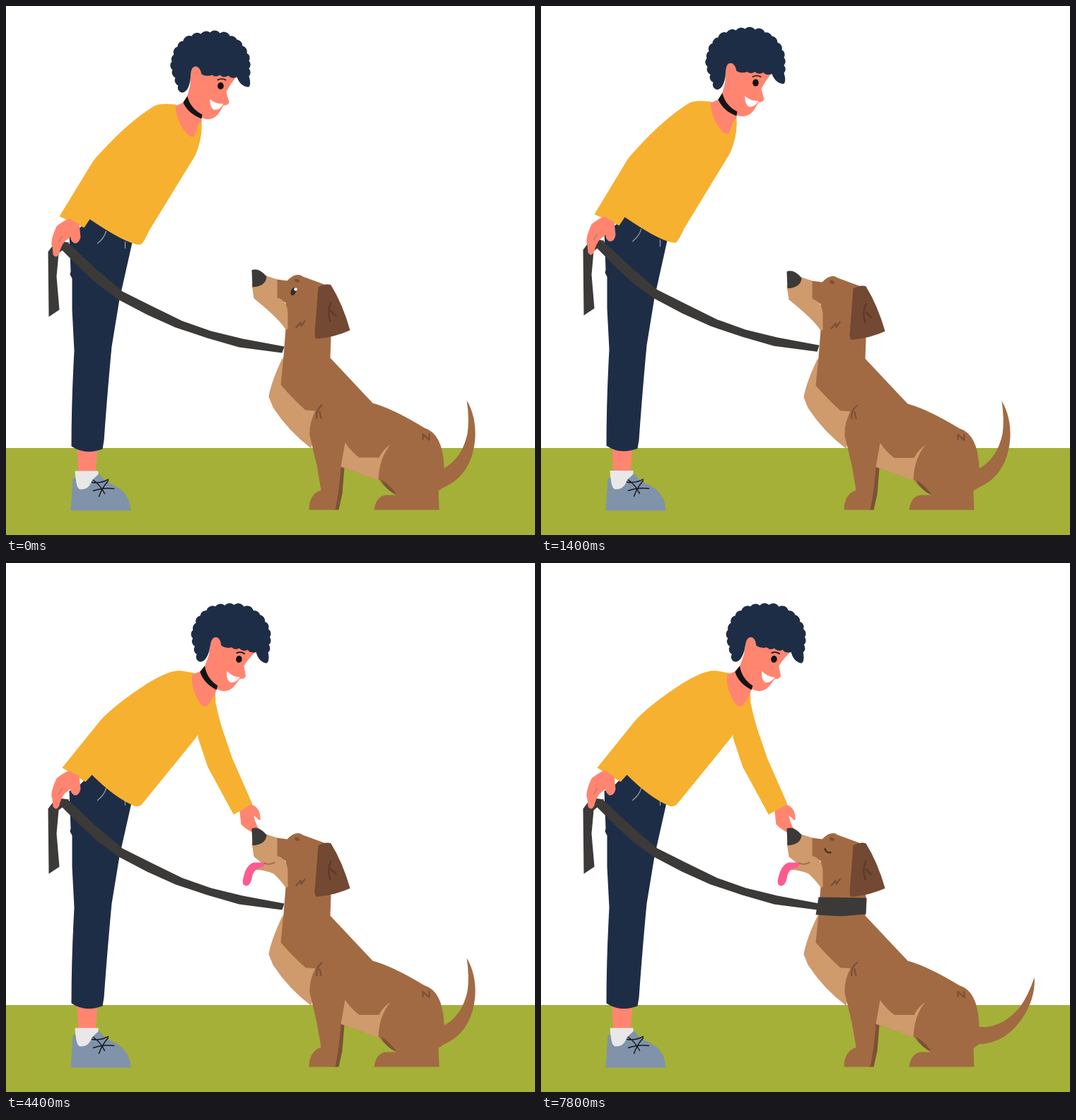
Recreate the animation shown at these times as an HTML page. Size 748x748 px, loop 9.8 s.

```html
<!DOCTYPE html>
<html lang="en">
<head>
<meta charset="utf-8">
<title>Meeting the dog</title>
<style>
  html, body { margin: 0; width: 100%; height: 100%; overflow: hidden; background: #fff; }
  svg { display: block; width: 100%; height: 100%; }
  .skin { fill: #ff8570; }
  .navy { fill: #1e2d46; }
  .shirt { fill: #f6b130; }
  .strap { fill: #3b3a39; }
  .fur { fill: #a26a43; }
  .light { fill: #cf9a6c; }
  .dark { fill: #734933; }
  .shade { fill: #7c5136; }
  .line { fill: none; stroke-width: 2.4; stroke-linecap: round; stroke-linejoin: round; }
</style>
</head>
<body>
<svg viewBox="0.5 0.5 748 748">
  <rect y="625.5" width="760" height="130" fill="#a5b038"/>

  <g id="person">
    <path class="skin" d="M101 626H130L127 662H103Z"/>
    <path fill="#e8e8e8" d="M98 658H131V666L120 686H100Z"/>
    <path fill="#8093aa" d="M95 668H99Q100 682 105 684Q118 685 122 671L132 662Q140 673 151 677Q176 688 177 714H92Z"/>
    <path class="line" stroke="#151a22" style="stroke-width:1.5" d="M122 674Q134 676 145 670M124 686Q138 681 153 683M124 671Q134 678 140 690M145 672Q136 682 132 694"/>
    <path class="navy" d="M121 298L105 314L90 323L92 376L91 380L94 386L94 430L97 488Q93 560 93 623Q112 636 137 627L139 615Q144 545 150 482L161 415L179 335Z"/>
    <path class="line" stroke="#8f99a8" style="stroke-width:1.3" d="M142 319Q140 328 130 336M169 334V343"/>

    <g id="arm">
      <path class="skin" d="M314 355L331 347Q342 353 342 363V370Q340 373 337 367L333 364Q335 379 341 389Q338 394 333 390Q320 382 314 374Z"/>
      <path class="shirt" d="M296 186Q298 215 303 240L312 280L333 347L305 359L276 288L267 246L270 200Z"/>
    </g>

    <g id="upright">
      <path class="shirt" d="M76 298L123 221Q128 214 135 207Q174 164 210 142Q218 137 241 140L260 160L277 163Q279 186 268 212L203 318Q194 338 190 338Q172 338 119 302L111 314Z"/>
      <path class="skin" d="M258 125L251 137L240 142Q242 166 257 182Q264 188 267 183L272 169L277 163V156Z"/>
    </g>
    <g id="leaning">
      <path class="shirt" d="M80 290L134 223Q154 201 200 171Q234 150 249 153L266 156L290 178L296 184Q299 200 292 217L268 249L194 340Q190 346 182 344Q155 333 122 300L113 310Z"/>
      <path class="skin" d="M281 146L275 154L264 158Q261 175 273 196Q280 207 286 202L291 194L296 186L299 176Z"/>
    </g>

    <g id="head">
      <path class="skin" d="M262 95Q263 86 269 86Q275 87 277 96L290 90L327 100Q318 110 312 122Q314 130 316 136Q315 141 308 141Q303 150 300 154Q291 164 278 159L256 132L261 112Z"/>
      <path class="navy" d="M250 123A7 7 0 0 1 244 113A8 8 0 0 1 240 102A8 8 0 0 1 236 91A8 8 0 0 1 235 79A8 8 0 0 1 238 69A8 8 0 0 1 243 58A8 8 0 0 1 251 50A9 9 0 0 1 263 43A9 9 0 0 1 276 40A9 9 0 0 1 289 38A9 9 0 0 1 303 39A9 9 0 0 1 317 43A9 9 0 0 1 327 48A9 9 0 0 1 335 57A8 8 0 0 1 341 67A8 8 0 0 1 344 78A8 8 0 0 1 344 89A8 8 0 0 1 344 100C347 108 346 116 342 115C335 114 330 109 327 101Q319 104 315 99Q308 103 303 98Q297 102 292 98Q284 101 277 97Q275 87 269 86Q263 86 262 95L261 106Q258 122 250 123Z"/>
      <path fill="#141414" d="M257 128Q261 145 278 154L277 160Q258 153 251 137Z"/>
      <path fill="#fff" d="M289 132Q296 139 308 139Q302 149 294 147Q288 142 289 132Z"/>
      <ellipse cx="304" cy="113.5" rx="4.3" ry="5" fill="#141414"/>
      <path class="line" stroke="#141414" style="stroke-width:1.7" d="M300 105Q305 102 311 105"/>
    </g>

    <path class="strap" d="M60 348L66 340L76 333L90 335L80 346L75 350L72 383L76 430L61 440Z"/>
    <path class="strap" d="M79 345L105 371L130 394L160 416L200 437L240 455L285 470L330 483L391 491L394 482L335 471L290 460L250 446L205 424L165 404L125 370L89 336Z"/>
    <g id="hand">
      <path class="skin" d="M72 312Q82 304 90 301L104 309L106 327Q104 337 97 336Q91 332 92 327L84 333Q78 340 76 350Q72 359 67 352L66 341Q62 334 72 312Z"/>
      <path class="line" stroke="#a87b78" style="stroke-width:1.2" d="M80 326L75 334"/>
    </g>
  </g>

  <g id="dog">
    <path id="tail" class="fur" d="M652 558Q665 580 664 610Q660 668 612 684L606 660L622 653Q646 638 653 605Q656 585 652 558Z"/>
    <path class="light" d="M392 497Q375 533 372 553L378 568Q400 602 432 626L445 575L395 525Z"/>
    <path class="shade" d="M473 650L479 653L476 690L471 713H464Z"/>
    <path class="fur" d="M383 387L398 389Q411 376 420 383L450 394L460 470L459 498L519 562Q548 570 592 597Q618 605 620 652L621 680L612 686L613 713H521Q524 693 538 692H553Q533 680 529 671L474 652Q472 684 466 713H429Q429 691 446 685L440 650L430 608Q429 590 438 573L424 572Q405 555 389 536L393 495L396 457V420L383 414Z"/>
    <path class="shade" d="M531 670Q537 685 553 692Q546 680 531 670Z"/>
    <path class="light" d="M480 618Q490 632 500 639L528 639Q534 627 544 621Q528 640 527 671L474 652Z"/>
    <path class="light" d="M365 381L384 387L384 413Q400 417 399 440V457L396 458Q386 442 351 414L348 394Z"/>
    <path class="strap" d="M348 374Q358 370 369 383Q368 397 349 398Z"/>
    <path class="dark" d="M442 398Q452 392 460 395Q477 423 487 459Q465 469 440 471Q437 471 437 463Z"/>
    <path class="line" stroke="#5d3a29" d="M460 420Q454 433 459 446M460 432L467 439"/>
    <path class="line" stroke="#7c5136" d="M411 455L417 448L418 453L423 446M447 565Q438 572 440 583M444 574L446 583M590 613V606L599 614V606"/>
    <ellipse cx="412" cy="389" rx="3.6" ry="2.2" transform="rotate(25 412 389)" class="shade"/>
    <g id="openEye">
      <ellipse cx="407" cy="404" rx="3.6" ry="6" transform="rotate(25 407 404)" fill="#30302f"/>
      <circle cx="410" cy="401" r="2.2" fill="#fff"/>
    </g>
    <path id="closedEye" class="line" stroke="#4a3022" d="M402 403Q404 409 410 408"/>
  </g>

  <g id="mouth">
    <path class="light" d="M353 434Q358 429 372 427L390 445Q372 435 353 434Z"/>
    <path fill="#fe5b8e" d="M369 424L351 424Q340 427 336 446Q333 457 341 457Q347 456 349 442Q351 433 364 430Z"/>
    <path class="line" stroke="#a26a43" style="stroke-width:1.8" d="M366 425Q373 428 380 424"/>
  </g>
  <path id="collar" class="strap" d="M393 473L461 474L460 497L425 500L389 498Z"/>
</svg>

<script>
  const LOOP = 9800, STEP = 200;
  const PHASES = [
    { start: 0, lastStep: 7 },
    { start: 3400, lastStep: 5 },
    { start: 6400, lastStep: 7 }
  ];
  const el = id => document.getElementById(id);
  const show = (id, on) => el(id).style.display = on ? "" : "none";
  const move = (id, transform) => el(id).setAttribute("transform", transform);
  const stretch = (id, factor) => move(id, `translate(0 713) scale(1 ${factor}) translate(0 -713)`);

  function draw(now) {
    const t = now % LOOP;
    const phase = t < PHASES[1].start ? 0 : t < PHASES[2].start ? 1 : 2;
    const { start, lastStep } = PHASES[phase];
    // Each phase alternates two poses, then holds the second one.
    const second = Math.min(Math.floor((t - start) / STEP), lastStep) % 2 === 1;
    const leaning = phase > 0, petting = phase === 2;

    show("upright", !leaning);
    for (const id of ["leaning", "arm", "mouth"]) show(id, leaning);
    show("collar", petting);
    show("openEye", !second);
    show("closedEye", second && petting);

    stretch("person", second && !leaning ? 1.0074 : 1);
    stretch("dog", second ? 0.9941 : 1);
    move("head", leaning ? "translate(26 23) rotate(6 304 113)" : "");
    move("hand", leaning ? "translate(0 -7)" : "");
    move("arm", `rotate(${second || petting ? -6.3 : 0} 288 200)`);
    move("tail", `rotate(${second && petting ? 27 : 0} 618 668)`);
  }

  const origin = performance.now();
  function tick() {
    draw(performance.now() - origin);
    requestAnimationFrame(tick);
  }
  tick();
</script>
</body>
</html>
```
